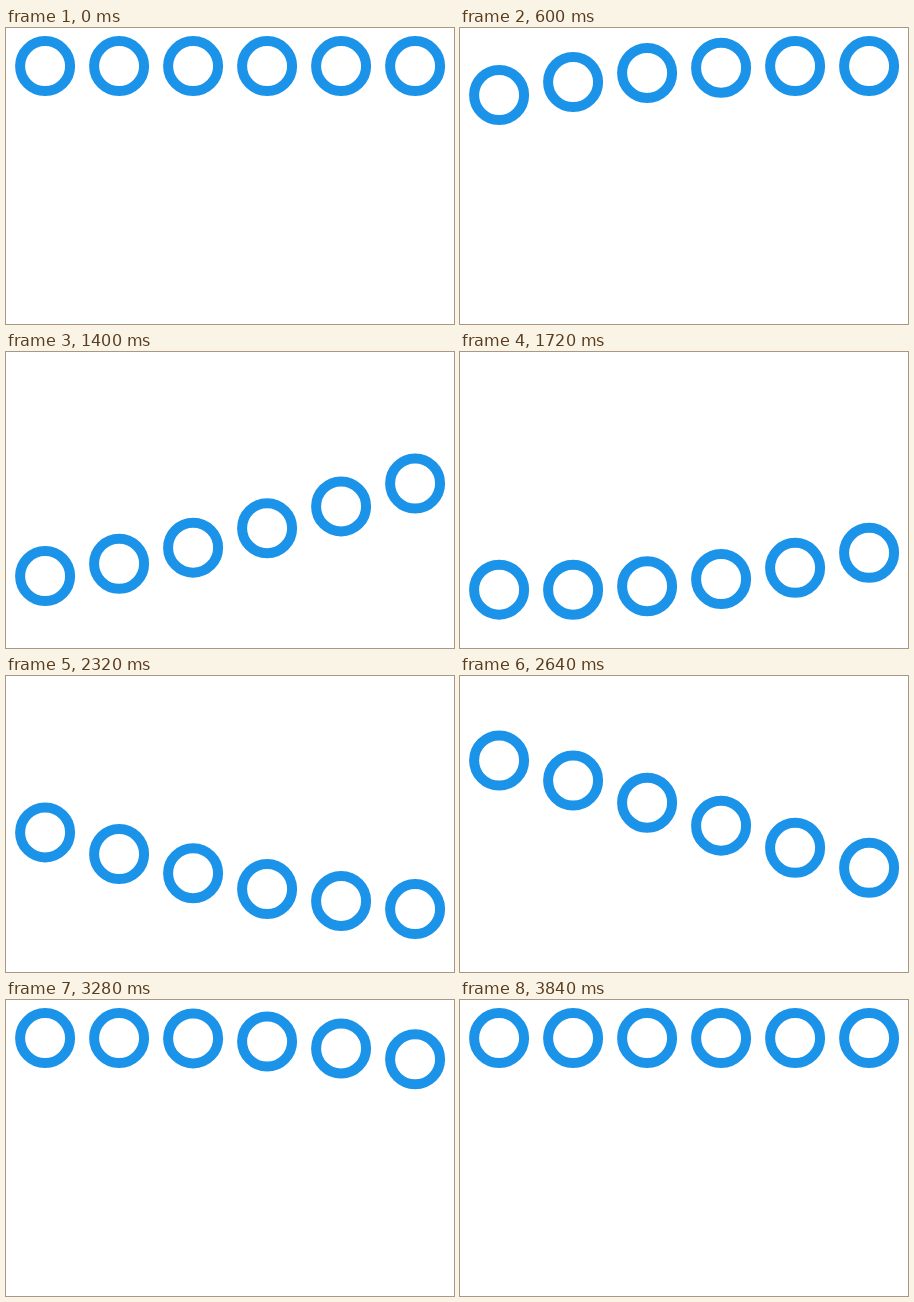
These frames come from a looping animation (448 by 296 pixels, 3880 ms). An HTML page with a canvas:

```html
<!DOCTYPE html>
<html lang="en">
<head>
<meta charset="utf-8">
<title>Ring wave</title>
<style>
  html, body { margin: 0; width: 100%; height: 100%; overflow: hidden; background: #fff; }
  canvas { display: block; }
</style>
</head>
<body>
<canvas id="stage" width="448" height="296"></canvas>
<script>
const ctx = document.getElementById('stage').getContext('2d');
const LOOP = 3880, SPEED = 4000 / LOOP;
const START = 223, TRAVEL = 1500, STAGGER = 100;
const RINGS = 6, LEFT = 39.1, GAP = 74, TOP = 38.1, DROP = 200;

// cubic-bezier(.42, 0, .58, 1)
function easeInOut(x) {
  let lo = 0, hi = 1;
  for (let i = 0; i < 24; i++) {
    const s = (lo + hi) / 2;
    if (1.26 * s - 0.78 * s * s + 0.52 * s ** 3 < x) lo = s; else hi = s;
  }
  return lo * lo * (3 - 2 * lo);
}

// One fall and one rise; at rest outside that span
function height(time) {
  const phase = Math.min(Math.max(time / TRAVEL, 0), 2);
  const x = 1 - Math.abs(1 - phase);
  return x > 0 ? DROP * easeInOut(x) : 0;
}

function draw(now) {
  const time = (now % LOOP) * SPEED - START;
  ctx.clearRect(0, 0, 448, 296);
  ctx.strokeStyle = '#1b93e9';
  ctx.lineWidth = 10;
  for (let i = 0; i < RINGS; i++) {
    ctx.beginPath();
    ctx.arc(LEFT + i * GAP, TOP + height(time - i * STAGGER), 25, 0, 2 * Math.PI);
    ctx.stroke();
  }
}

const begin = performance.now();
function tick() {
  draw(performance.now() - begin);
  requestAnimationFrame(tick);
}
tick();
</script>
</body>
</html>
```
